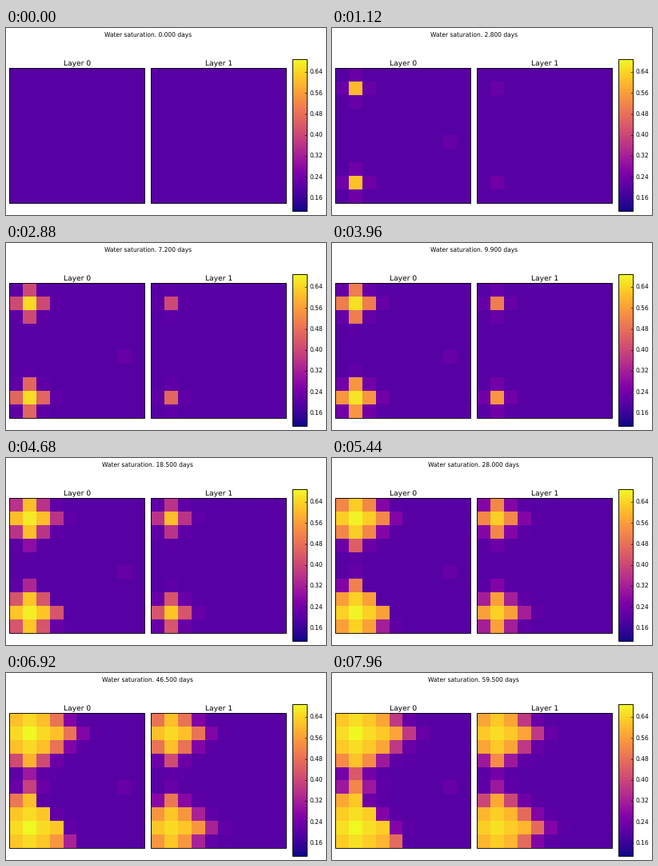
Animation of 400x234 px, one loop 8 s. Source, as a matplotlib script:

```python
import numpy as np
import matplotlib.pyplot as plt
from matplotlib.animation import FuncAnimation
from matplotlib.patches import Rectangle

W, H, DPI = 400, 234, 64
PT = 72 / DPI  # points per pixel
FRAMES, STEP_MS = 200, 40
S0, VMIN, VMAX = 0.2, 0.11, 0.689
SIDE, TOP = 169, 50
BAR = (358, 376, 39, 229)

ROW, COL = np.mgrid[0:10, 0:10]
LOWER = ROW >= 5
PRODUCER = (5, 8)


def front(layer):
    """Flow distance from the nearer injector and the day water arrives."""
    dy = np.minimum(abs(ROW - 1), abs(ROW - 8))
    dist = abs(COL - 1) + dy ** 1.2 + layer
    if layer == 0:
        # tight rock beyond a diagonal in the lower right
        dist = dist + 2 * ((ROW > 5) & (COL >= ROW - 4))
    arrival = 0.9 + 6.3 * dist ** 1.65
    return dist, arrival * np.where(LOWER, 0.85, 1)


FRONTS = [front(0), front(1)]


def day_at(i):
    return 0.1 * i if i <= 100 else 10 + 0.5 * (i - 100)


def saturation(layer, day):
    dist, arrival = FRONTS[layer]
    rel = max(day, 1e-3) / arrival
    steep = 2.2 + 0.9 * dist
    s = S0 + 0.41 / (1 + rel ** -steep) + 0.02 * np.log(np.maximum(rel, 1))
    if layer == 0:
        s[PRODUCER] = S0 + 0.025 * (1 - np.exp(-day))
    return s


plt.rcParams["font.family"] = "DejaVu Sans"
plt.rcParams["text.hinting"] = "none"
fig = plt.figure(figsize=(W / DPI, H / DPI), dpi=DPI, facecolor="white")
ax = fig.add_axes([0, 0, 1, 1])
ax.axis("off")


def picture(data, x0, x1, y0, y1, vmin=VMIN, vmax=VMAX):
    img = ax.imshow(data, cmap="plasma", vmin=vmin, vmax=vmax, aspect="auto",
                    interpolation="nearest", extent=(x0, x1, y1, y0))
    ax.add_patch(Rectangle((x0 + 0.5, y0 + 0.5), x1 - x0, y1 - y0, fill=False,
                           ec="black", lw=0.9 * PT, snap=False, zorder=3))
    return img


def label(x, y, text, px, ha="center"):
    return ax.text(x, y, text, fontsize=px * PT, ha=ha, va="baseline")


layers = []
for n, left in enumerate((4, 181)):
    layers.append(picture(saturation(n, 0), left, left + SIDE, TOP, TOP + SIDE))
    label(left + 84.6, 47.5, f"Layer {n}", 9.1)

bx0, bx1, by0, by1 = BAR
picture(np.linspace(1, 0, 256)[:, None], *BAR, vmin=0, vmax=1)
for v in np.arange(0.16, 0.65, 0.08):
    y = by1 + 0.5 - (v - VMIN) / (VMAX - VMIN) * (by1 - by0)
    ax.plot([bx1 - 2, bx1 + 0.5], [y, y], color="black", lw=0.6 * PT,
            snap=False, zorder=4)
    label(379.2, y + 2.7, f"{v:.2f}", 7.5, "left")

title = label(177.4, 10.3, "", 7.5)
ax.set_xlim(0, W)
ax.set_ylim(H, 0)


def update(i):
    day = day_at(i)
    title.set_text(f"Water saturation. {day:.3f} days")
    for n, img in enumerate(layers):
        img.set_data(saturation(n, day))
    return [title, *layers]


anim = FuncAnimation(fig, update, frames=FRAMES, interval=STEP_MS,
                     repeat=True, repeat_delay=0, blit=False)
plt.show()
```
